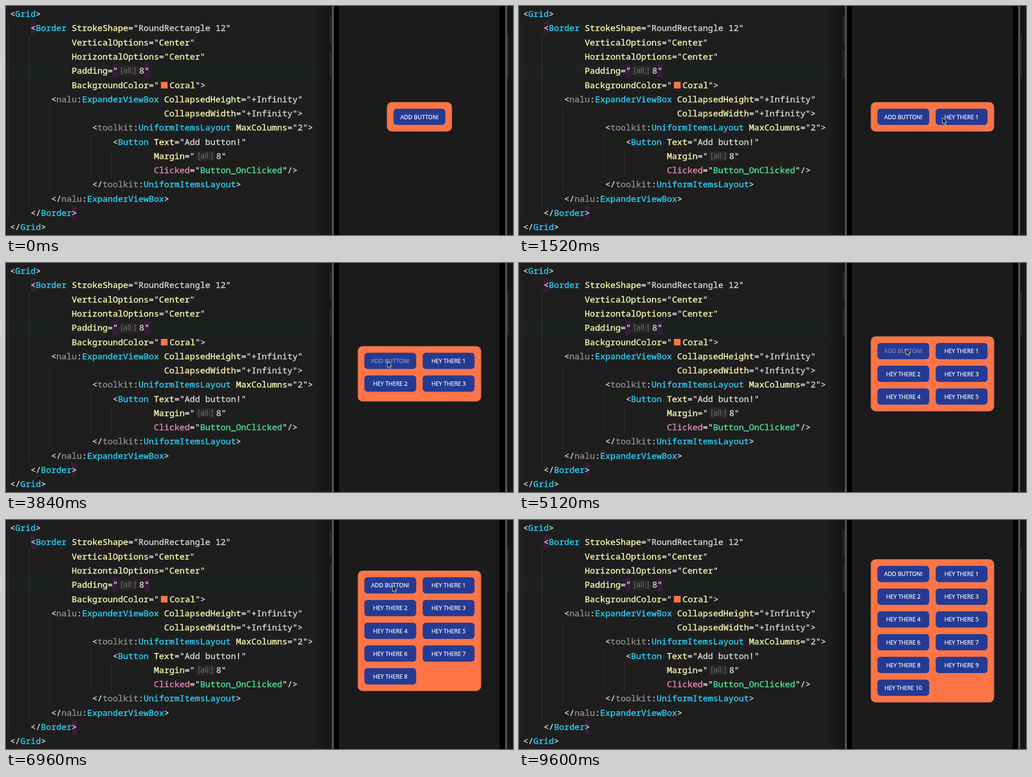
An HTML page that plays this animation: 1111 px wide and 504 px high, repeating every 9.68 s.

```html
<!DOCTYPE html>
<html lang="en">
<head>
<meta charset="utf-8">
<title>Expander view box</title>
<style>
  html, body { margin: 0; width: 100%; height: 100%; overflow: hidden; background: #1e1e1e; }
  svg { display: block; width: 1111px; height: 504px; }
  text { white-space: pre; }
  .code { font: 18.75px "Noto Sans Mono", monospace; stroke-width: .5; }
  .hint { font: 17px Inter, sans-serif; fill: #6c6c6c; }
  .label { font: 12.6px "Open Sans", sans-serif; fill: #fff; stroke: #fff; stroke-width: .3; text-anchor: middle; }
</style>
</head>
<body>
<svg id="stage" viewBox="0 0 1111 504">
  <defs>
    <linearGradient id="shadeLeft">
      <stop offset="0" stop-color="#101010" stop-opacity="0"/>
      <stop offset="1" stop-color="#101010" stop-opacity=".8"/>
    </linearGradient>
    <linearGradient id="rim">
      <stop offset="0" stop-color="#121212"/>
      <stop offset=".5" stop-color="#6a6a6a"/>
      <stop offset="1" stop-color="#202020"/>
    </linearGradient>
    <clipPath id="inner"><rect id="innerRect"/></clipPath>
  </defs>
  <rect width="1111" height="504" fill="#1e1e1e"/>
  <g id="editor"></g>
  <g id="phone"></g>
  <rect id="panel" rx="10.5" fill="#ff7446" stroke="#8f6250" stroke-width=".9"/>
  <g clip-path="url(#inner)"><g id="buttons"></g></g>
  <path id="cursor" d="M0 0V13.2L3 10.4L5.1 15L7.3 14L5.2 9.6H9.4Z" fill="#000" stroke="#fff" stroke-width="1" stroke-linejoin="round"/>
</svg>
<script>
const LOOP = 9680, STEP = 80;
const $ = id => document.getElementById(id);

function set(node, attrs) {
  for (const key in attrs) node.setAttribute(key, attrs[key]);
  return node;
}
function add(parent, tag, attrs, text) {
  const node = set(document.createElementNS('http://www.w3.org/2000/svg', tag), attrs);
  if (text !== undefined) node.textContent = text;
  parent.append(node);
  return node;
}
const box = (parent, x, y, width, height, fill, more) =>
  add(parent, 'rect', { x, y, width, height, fill, ...more });

// Editor: every token starts with its colour key.
const INK = {
  w: '#d2d2d2', t: '#25cdf3', a: '#f4f1a8', n: '#8c8c8c', p: '#e086b3', g: '#45e297'
};
const ROW = 31.27, COL = 11.25;
const LINES = [
  [0, 0, 'w<|tGrid|w>'],
  [1, 4, 'w<|tBorder|a StrokeShape|w="RoundRectangle 12"'],
  [2, 12, 'aVerticalOptions|w="|aCenter|w"'],
  [3, 12, 'aHorizontalOptions|w="|aCenter|w"'],
  [4, 12, 'aPadding|w="'],
  [4, 25.13, 'w8"'],
  [5, 12, 'aBackgroundColor|w="'],
  [5, 31.07, 'aCoral|w">'],
  [6, 8, 'w<|nnalu|w:|tExpanderViewBox|a CollapsedHeight|w="+Infinity"'],
  [7, 30, 'aCollapsedWidth|w="+Infinity">'],
  [8, 16, 'w<|ntoolkit|w:|tUniformItemsLayout|a MaxColumns|w="2">'],
  [9, 20, 'w<|tButton|a Text|w="Add button!"'],
  [10, 28, 'aMargin|w="'],
  [10, 40.13, 'w8"'],
  [11, 28, 'pClicked|w="|gButton_OnClicked|w"/>'],
  [12, 16, 'w</|ntoolkit|w:|tUniformItemsLayout|w>'],
  [13, 8, 'w</|nnalu|w:|tExpanderViewBox|w>'],
  [14, 4, 'w</|tBorder|w>'],
  [15, 0, 'w</|tGrid|w>']
];

function drawEditor(g) {
  box(g, 0, 127, 690, 31, '#1d2121');

  for (const [x, top, bottom, color] of [
    [5, 33, 470, '#343434'], [50, 64, 439, '#50305a'], [95, 221, 407, '#343434'],
    [185, 283, 376, '#343434'], [230, 314, 376, '#343434']
  ]) box(g, x, top, 1, bottom - top, color);

  for (const [x, y] of [[54, 33.5], [234, 127.5], [303, 127.5], [144, 440]])
    box(g, x, y, 11, 30.5, '#371c38');

  for (const [x, row] of [[247, 4], [416, 10]]) {
    const y = row * ROW;
    box(g, x, y + 7, 42, 21, '#272727', { rx: 4 });
    add(g, 'text', { class: 'hint', x: x + 3.7, y: y + 23.3 }, '[all:]');
  }
  box(g, 339.5, 167, 14.5, 14.5, '#ff7446');

  for (const [row, col, source] of LINES) {
    const line = add(g, 'text', { class: 'code', x: 9 + col * COL, y: 24.2 + row * ROW });
    for (const token of source.split('|')) {
      const ink = INK[token[0]];
      add(line, 'tspan', { fill: ink, stroke: ink }, token.slice(1));
    }
  }
}

function drawPhone(g) {
  box(g, 676, 0, 38, 504, 'url(#shadeLeft)');
  box(g, 1098, 0, 13, 504, '#151515');
  for (const [x, y, h] of [[710, 23, 59], [710, 98, 60], [1097.5, 63, 94]])
    box(g, x, y, 4, h, '#262626', { rx: 1, stroke: '#424242', 'stroke-width': .6 });
  box(g, 713, 0, 6, 504, 'url(#rim)');
  box(g, 1093, 0, 6, 504, 'url(#rim)');
  box(g, 719, 0, 374, 504, '#000');
  box(g, 730, 0, 351.5, 504, '#1b1b1b');
}

// Panel geometry
const CENTER = { x: 906, y: 243.9 };
const PITCH = { x: 127.8, y: 50.05 };
const BASE = { w: 142.2, h: 64.4 };
const PAD = 7.15, INSET = 14.3, BUTTON = { w: 113.6, h: 35.8 };

// Moments of release; each adds one button.
const CLICKS = [720, 2450, 3130, 3805, 4480, 5165, 5830, 6490, 7140, 7802];
const GROW = 250, HOLD = 110, DIM = .42, FADE = 250;

const POINTER = [
  [400, 985, 500], [640, 928, 246], [1700, 928, 246], [2200, 838, 246],
  [2600, 838, 246], [3000, 836, 226], [3500, 836, 217], [3900, 836, 217],
  [4500, 848, 192], [4900, 848, 189], [5240, 848, 189], [5700, 851, 163],
  [6500, 851, 163], [7000, 847, 144], [8500, 847, 144], [9400, 1112, 200]
];

const clamp = v => Math.min(1, Math.max(0, v));
const mix = (a, b, k) => a + (b - a) * k;

const buttons = Array.from({ length: CLICKS.length + 1 }, (_, i) => {
  const g = add($('buttons'), 'g', {
    transform: `translate(${i % 2 * PITCH.x} ${Math.floor(i / 2) * PITCH.y})`
  });
  box(g, 0, 0, BUTTON.w, BUTTON.h, '#253b93', { rx: 7 });
  const label = add(g, 'text', { class: 'label', x: BUTTON.w / 2, y: 22.5 },
    i ? `HEY THERE ${i}` : 'ADD BUTTON!');
  return { g, label };
});

const columns = count => Math.min(count, 2);
const rows = count => Math.ceil(count / 2);

function panelSize(t) {
  const added = CLICKS.filter(c => c <= t).length;
  const k = added ? clamp((t - CLICKS[added - 1]) / GROW) : 1;
  const now = added + 1, before = Math.max(1, added);
  return {
    count: now,
    w: BASE.w + PITCH.x * (mix(columns(before), columns(now), k) - 1),
    h: BASE.h + PITCH.y * (mix(rows(before), rows(now), k) - 1)
  };
}

function labelOpacity(t) {
  if (CLICKS.some(c => t >= c - HOLD && t < c)) return DIM;
  const last = CLICKS.filter(c => c <= t).pop();
  return last === undefined ? 1 : mix(DIM, 1, clamp((t - last) / FADE));
}

function placePointer(t) {
  const i = POINTER.findIndex(p => p[0] > t);
  $('cursor').style.display = i > 0 ? '' : 'none';
  if (i < 1) return;
  const [t0, x0, y0] = POINTER[i - 1], [t1, x1, y1] = POINTER[i];
  const k = (t - t0) / (t1 - t0), eased = k * k * (3 - 2 * k);
  set($('cursor'), { transform: `translate(${mix(x0, x1, eased)} ${mix(y0, y1, eased)})` });
}

function render(t) {
  const { count, w, h } = panelSize(t);
  const x = CENTER.x - w / 2, y = CENTER.y - h / 2;
  set($('panel'), { x, y, width: w, height: h });
  set($('innerRect'), { x: x + PAD, y: y + PAD, width: w - 2 * PAD, height: h - 2 * PAD });
  set($('buttons'), { transform: `translate(${x + INSET} ${y + INSET})` });
  buttons.forEach(({ g }, i) => { g.style.display = i < count ? '' : 'none'; });
  buttons[0].label.style.opacity = labelOpacity(t);
  placePointer(t);
}

drawEditor($('editor'));
drawPhone($('phone'));
const start = performance.now();
function tick() {
  const t = (performance.now() - start) % LOOP;
  render(Math.floor(t / STEP) * STEP);
  requestAnimationFrame(tick);
}
tick();
</script>
</body>
</html>
```
